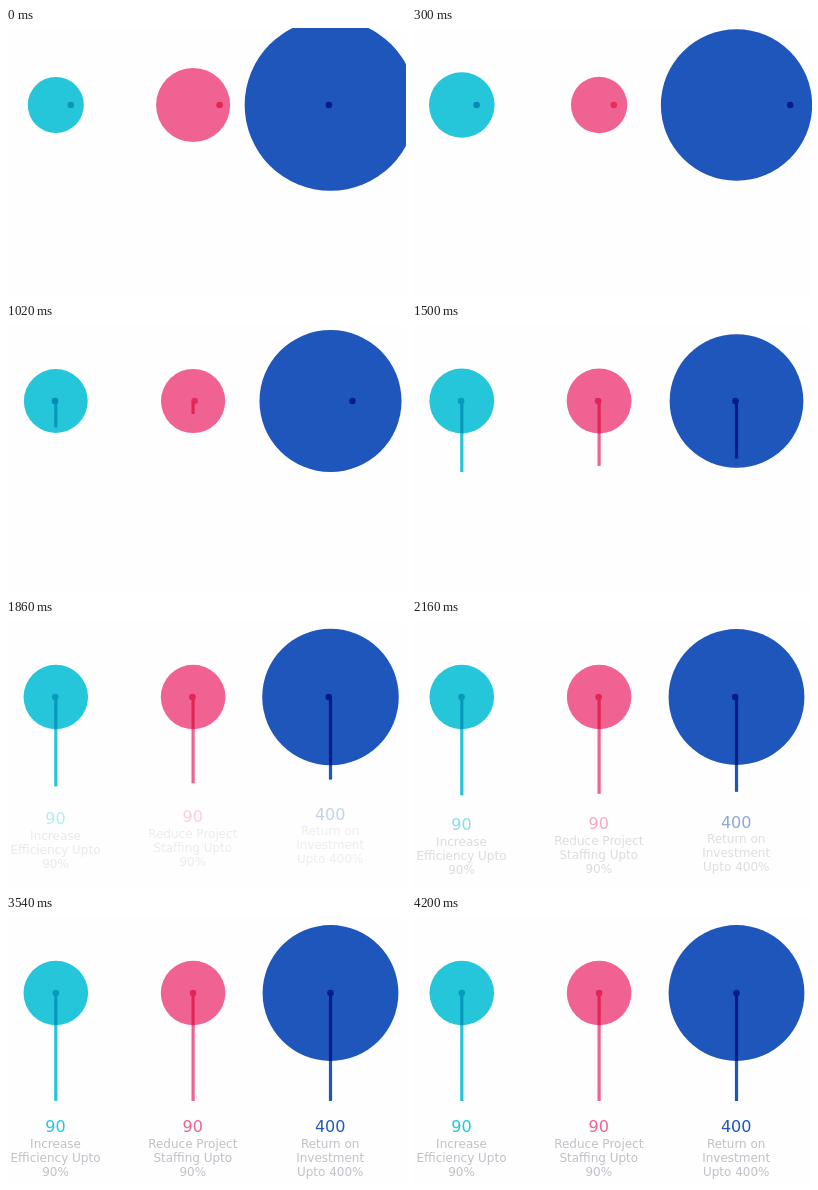
Recreate the animation shown at these times as an HTML page. Size 400x268 px, loop 4740 ms.

```html
<!DOCTYPE html>
<html lang="en">
<head>
<meta charset="utf-8">
<title>Key figures</title>
<style>
  html, body { margin: 0; width: 100%; height: 100%; overflow: hidden; background: #fefefe; }
  svg { display: block; width: 400px; height: 268px; background: #fefefe; }
  text { font: 12px "DejaVu Sans", sans-serif; text-anchor: middle; fill: #c0c0c8; }
  .num { font-size: 16px; }
  .pin { mix-blend-mode: multiply; }
</style>
</head>
<body>
<svg id="stage" viewBox="0 0 400 268"></svg>
<script>
const LOOP = 4740, STEP = 60, LAST = 4200;
const CY = 77, LINE = 108;

const items = [
  { x: 49.8, r: 32.3, color: '#26c6da', lead: 858, reach: 1, num: '90',
    lines: ['Increase', 'Efficiency Upto', '90%'], tint: 0.75 },
  { x: 187.1, r: 32.3, color: '#f06292', lead: 588, reach: 1, num: '90',
    lines: ['Reduce Project', 'Staffing Upto', '90%'], fade: 0.4 },
  { x: 324.5, r: 67.9, color: '#1e56bb', lead: 306, reach: 2, num: '400',
    lines: ['Return on', 'Investment', 'Upto 400%'] }
];

// Sideways swing of the dot: [local time, offset]
const swing = [[306, -0.8], [588, 26.5], [858, 15], [966, 15.5], [1248, 13.5],
               [1515, 3.5], [1806, -0.5], [2360, -0.7], [3500, 0]];

const stage = document.getElementById('stage');

function add(parent, tag, attrs, text) {
  const el = document.createElementNS('http://www.w3.org/2000/svg', tag);
  set(el, attrs);
  if (text) el.textContent = text;
  parent.append(el);
  return el;
}

function set(el, attrs) {
  for (const key in attrs) el.setAttribute(key, attrs[key]);
}

const clamp = v => Math.min(1, Math.max(0, v));

function elasticOut(p) {
  if (p >= 1) return 1;
  return 1 + 2 ** (-10 * p) * Math.sin((p - 0.075) * 2 * Math.PI / 0.3);
}

// What is left of an ease-out between two times
const rest = (t, from, to, power) => clamp((to - t) / (to - from)) ** power;

function slope(i) {
  if (i === 0 || i === swing.length - 1) return 0;
  const [a, b] = [swing[i - 1], swing[i + 1]];
  return (b[1] - a[1]) / (b[0] - a[0]);
}

function swingAt(t) {
  const i = swing.findIndex(k => k[0] > t) - 1;
  if (i === -2) return 0;
  if (i < 0) return swing[0][1];
  const [t0, v0] = swing[i], [t1, v1] = swing[i + 1];
  const d = t1 - t0, u = (t - t0) / d, w = 1 - u;
  return v0 * (1 + 2 * u) * w * w + v1 * u * u * (3 - 2 * u)
       + d * u * w * (slope(i) * w - slope(i + 1) * u);
}

for (const it of items) {
  const { x, color } = it;
  it.disc = add(stage, 'circle', { cx: x, cy: CY, r: it.r, fill: color });
  const pin = add(stage, 'g', { class: 'pin' });
  it.line = add(pin, 'rect', { x: x - 1.6, y: CY, width: 3.2, height: 0, fill: color });
  it.dot = add(pin, 'circle', { cy: CY, r: 3.3, fill: color });
  if (it.tint) it.glow = add(stage, 'circle', { cy: CY, r: 3.2, fill: '#0d58b4' });
  it.label = add(stage, 'g', {});
  add(it.label, 'text', { x: x - 0.3, y: 216.2, class: 'num', style: `fill:${color}` }, it.num);
  it.lines.forEach((s, i) => add(it.label, 'text', { x: x - 0.3, y: 231.8 + 14 * i }, s));
}

function draw(t) {
  const pulse = Math.exp(-(((t - 660) / 350) ** 2));
  items.forEach((it, i) => {
    const local = t + it.lead;
    const left = rest(t, 830 + 105 * i, 4300, 5);
    const cx = it.x + swingAt(local) * it.reach;
    set(it.disc, { r: it.r * elasticOut(local / 3000) });
    set(it.dot, { cx, opacity: 1 - (it.fade || 0) * pulse });
    if (it.glow) set(it.glow, { cx, opacity: it.tint * pulse });
    set(it.line, { height: LINE * (1 - left) });
    set(it.label, {
      transform: `translate(0 ${-70 * left})`,
      opacity: 1 - rest(t, 1540 + 40 * i, 4150, 3)
    });
  });
}

const start = performance.now();
function tick() {
  const t = (performance.now() - start) % LOOP;
  draw(Math.min(LAST, Math.floor(t / STEP) * STEP));
  requestAnimationFrame(tick);
}
tick();
</script>
</body>
</html>
```
